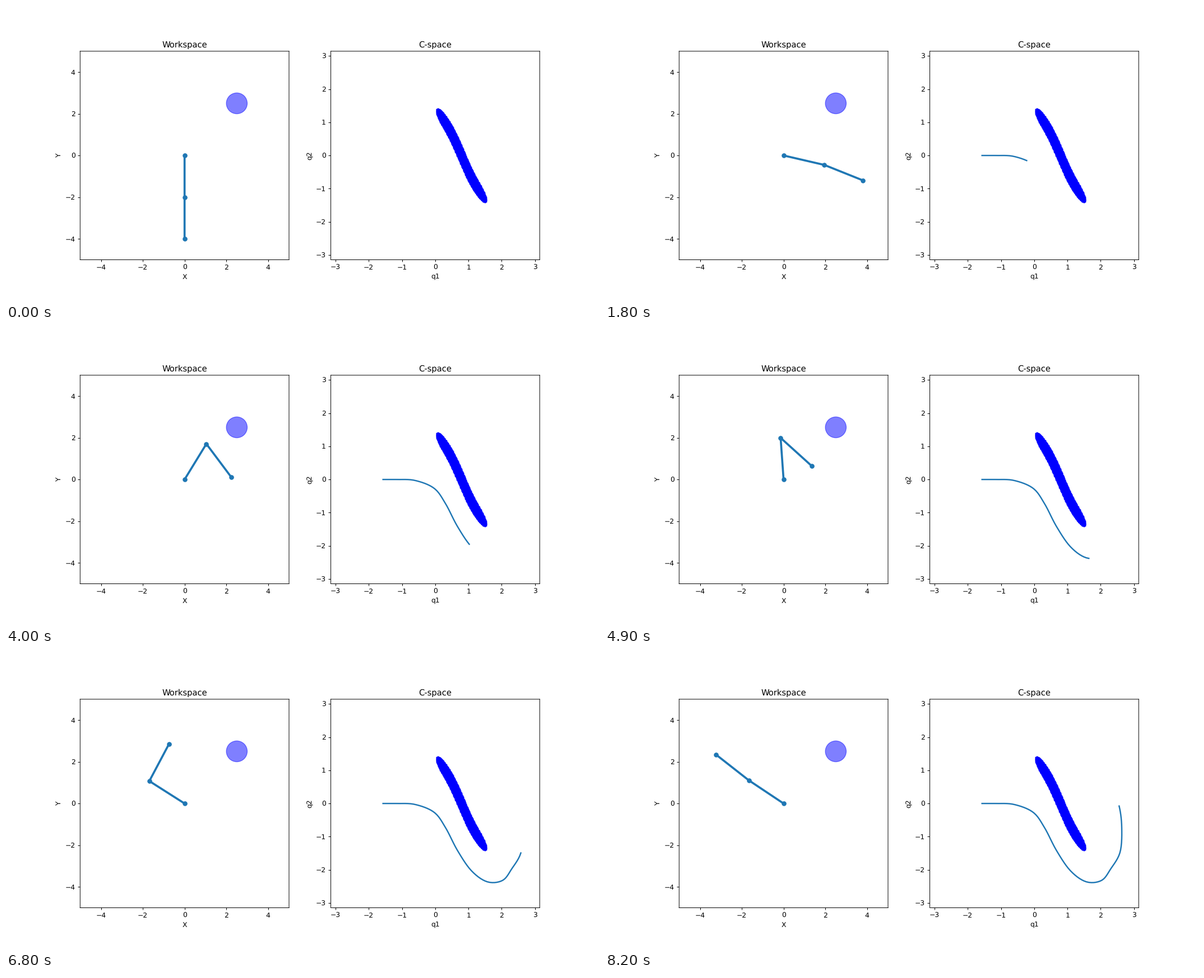
Animation, 1058 px wide and 529 px high, one loop 8300 ms. Source, as a matplotlib script:

```python
import numpy as np
import matplotlib.pyplot as plt
from matplotlib.animation import FuncAnimation

FRAMES, INTERVAL = 83, 100
LINK = 2.0
CENTER, RADIUS = np.array([2.5, 2.5]), 0.5

# Joint angles at equal time steps along the path
Q1 = [-np.pi / 2, -1.15, -0.605, -0.035, 0.31, 0.668, 1.087,
      1.56, 2.02, 2.297, 2.583, 2.631, 2.553]
Q2 = [0, 0, -0.03, -0.265, -0.73, -1.415, -2.025,
      -2.358, -2.32, -1.975, -1.46, -0.715, -0.077]


def smooth_path(keys):
    """One value per frame on a smooth cubic through evenly timed keys."""
    keys = np.asarray(keys)
    slopes = np.gradient(keys, edge_order=2)
    t = np.linspace(0, len(keys) - 1, FRAMES)
    i = np.minimum(t.astype(int), len(keys) - 2)
    s = t - i
    return ((1 + 2 * s) * (1 - s) ** 2 * keys[i]
            + s * (1 - s) ** 2 * slopes[i]
            + s ** 2 * (3 - 2 * s) * keys[i + 1]
            + s ** 2 * (s - 1) * slopes[i + 1])


def joints(q1, q2):
    """Base, elbow and tip coordinates of the arm."""
    ex, ey = LINK * np.cos(q1), LINK * np.sin(q1)
    return ([0, ex, ex + LINK * np.cos(q1 + q2)],
            [0, ey, ey + LINK * np.sin(q1 + q2)])


def blocked_configs(n=500):
    """Grid configurations whose second link touches the obstacle."""
    axis = np.linspace(-np.pi, np.pi, n)
    q1, q2 = np.meshgrid(axis, axis)
    dx = CENTER[0] - LINK * np.cos(q1)
    dy = CENTER[1] - LINK * np.sin(q1)
    ux, uy = np.cos(q1 + q2), np.sin(q1 + q2)
    along = np.clip(dx * ux + dy * uy, 0, LINK)
    hit = np.hypot(dx - along * ux, dy - along * uy) <= RADIUS
    return q1[hit], q2[hit]


def setup(ax, limit, title, xlabel, ylabel):
    ax.set(xlim=(-limit, limit), ylim=(-limit, limit), aspect="equal",
           title=title, xlabel=xlabel, ylabel=ylabel)


path1 = smooth_path(Q1)
path2 = np.minimum(smooth_path(Q2), 0)

plt.rcParams.update({"font.family": "DejaVu Sans", "path.snap": False,
                     "text.hinting": "none"})
fig, (work, cspace) = plt.subplots(1, 2, figsize=(12, 6), dpi=88.1667)
setup(work, 5, "Workspace", "X", "Y")
setup(cspace, np.pi, "C-space", "q1", "q2")

work.add_patch(plt.Circle(CENTER, RADIUS, color="b", alpha=0.5))
cspace.scatter(*blocked_configs(), s=2, color="b", linewidths=0)
arm, = work.plot([], [], "o-", color="C0", lw=3)
trace, = cspace.plot([], [], color="C0", lw=2)


def update(frame):
    arm.set_data(*joints(path1[frame], path2[frame]))
    trace.set_data(path1[:frame + 1], path2[:frame + 1])
    return arm, trace


anim = FuncAnimation(fig, update, frames=FRAMES, interval=INTERVAL,
                     init_func=lambda: update(0), repeat=True, repeat_delay=0)
plt.show()
```
